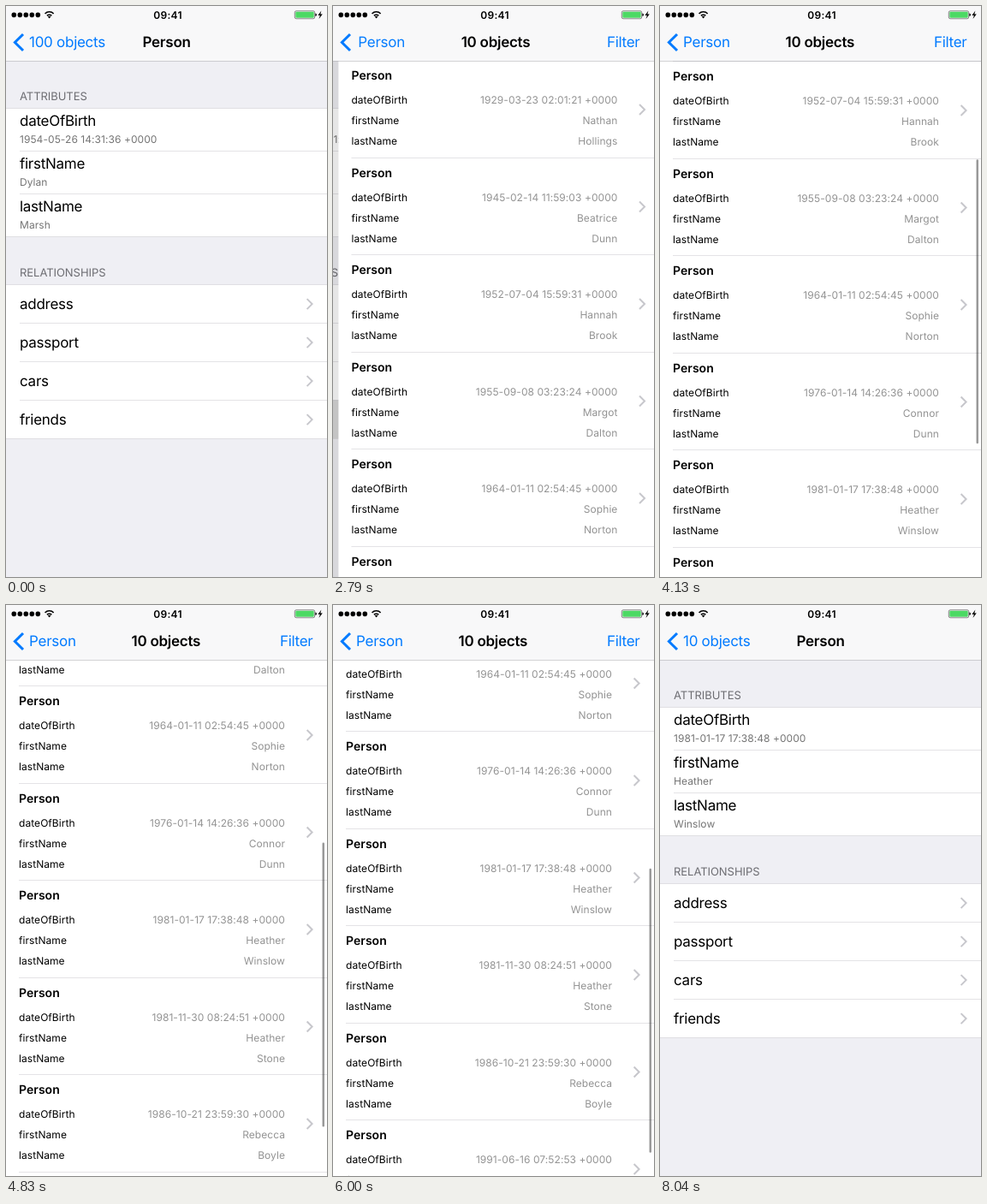
Recreate the animation shown at these times as an HTML page. Size 375 by 667 pixels, loop 9.12 s.

```html
<!DOCTYPE html>
<html lang="en">
<head>
<meta charset="utf-8">
<title>Object browser</title>
<style>
  html, body { margin: 0; width: 100%; height: 100%; overflow: hidden; background: #efeff4; }
  svg { display: block; width: 375px; height: 667px; }
  text { font-family: Inter, "Open Sans", sans-serif; text-rendering: geometricPrecision; }
  .big { font-size: 17px; letter-spacing: -.27px; }
  .bold { font-weight: 600; }
  .blue { fill: #007aff; }
  .small { font-size: 12px; letter-spacing: .06px; }
  .cell { font-size: 14px; font-weight: 600; letter-spacing: .04px; }
  .head { font-size: 13px; letter-spacing: -.05px; fill: #6d6d72; }
  .sub { fill: #747474; }
  .value { fill: #939393; text-anchor: end; }
  .clock { font-size: 12px; font-weight: 600; letter-spacing: .3px; text-anchor: middle; }
  .line { fill: #c8c7cc; }
  .more { fill: none; stroke: #c7c7cc; stroke-width: 2; }
</style>
</head>
<body>
<svg id="stage" viewBox="0 0 375 667"></svg>
<script>
const W = 375, H = 667, LOOP = 9120, BAR = 64, ROW = 113.5;
const PUSH = 540, TAPS = [2380, 6920];
const DRAG = 3660, RELEASE = 3900, TAU = 512, REST = 490.6, GLIDE = 415.3;

const people = [
  ['1929-03-23 02:01:21', 'Nathan', 'Hollings'],
  ['1945-02-14 11:59:03', 'Beatrice', 'Dunn'],
  ['1952-07-04 15:59:31', 'Hannah', 'Brook'],
  ['1955-09-08 03:23:24', 'Margot', 'Dalton'],
  ['1964-01-11 02:54:45', 'Sophie', 'Norton'],
  ['1976-01-14 14:26:36', 'Connor', 'Dunn'],
  ['1981-01-17 17:38:48', 'Heather', 'Winslow'],
  ['1981-11-30 08:24:51', 'Heather', 'Stone'],
  ['1986-10-21 23:59:30', 'Rebecca', 'Boyle'],
  ['1991-06-16 07:52:53', 'Olivia', 'Grant']
].map(([date, ...names]) => [date + ' +0000', ...names]);
const owner = ['1954-05-26 14:31:36 +0000', 'Dylan', 'Marsh'];
const fields = ['dateOfBirth', 'firstName', 'lastName'];
const relations = ['address', 'passport', 'cars', 'friends'];

const stage = document.getElementById('stage');

function add(parent, tag, attrs = {}, text) {
  const node = document.createElementNS('http://www.w3.org/2000/svg', tag);
  for (const key in attrs) node.setAttribute(key, attrs[key]);
  if (text) node.textContent = text;
  return parent.appendChild(node);
}
const box = (parent, x, y, width, height, fill) => add(parent, 'rect', { x, y, width, height, fill });
const label = (parent, x, y, cls, text) => add(parent, 'text', { x, y, class: cls }, text);
const line = (parent, x, y) => add(parent, 'rect', { x, y, width: W - x, height: .5, class: 'line' });
const more = (parent, y) => add(parent, 'path', { d: `M351.6 ${y - 6}l6 6-6 6`, class: 'more' });

function makeDetail(person) {
  const view = add(stage, 'g');
  box(view, 0, 0, W, H, '#efeff4');

  label(view, 16, 109.6, 'head', 'ATTRIBUTES');
  box(view, 0, 119.5, W, 150, '#fff');
  line(view, 0, 119.5);
  fields.forEach((name, i) => {
    const y = 119.5 + i * 50;
    label(view, 16, y + 20.5, 'big', name);
    label(view, 16, y + 40.7, 'small sub', person[i]);
    line(view, i < 2 ? 16 : 0, y + 49.5);
  });

  label(view, 16, 315.6, 'head', 'RELATIONSHIPS');
  box(view, 0, 325.5, W, 180, '#fff');
  line(view, 0, 325.5);
  const glow = box(view, 0, 460.2, W, 45, '#d9d9d9');
  relations.forEach((name, i) => {
    const y = 325.5 + i * 45;
    label(view, 16, y + 28.6, 'big', name);
    more(view, y + 22.6);
    line(view, i < 3 ? 16 : 0, y + 44.5);
  });
  return { view, glow };
}

function makeList() {
  const view = add(stage, 'g');
  box(view, 0, 0, W, H, '#fff');
  const rows = add(view, 'g');
  const glow = box(rows, 0, BAR + 6 * ROW - .5, W, ROW, '#d9d9d9');
  people.forEach((person, i) => {
    const y = BAR + i * ROW;
    label(rows, 15, y + 22.4, 'cell', 'Person');
    fields.forEach((name, j) => {
      label(rows, 15, y + 50.3 + j * 24, 'small', name);
      label(rows, 326, y + 50.3 + j * 24, 'small value', person[j]);
    });
    more(rows, y + 57);
    line(rows, 15, y + 113);
  });
  const thumb = add(view, 'rect', { x: 369.5, y: 0, width: 2.5, height: 332, rx: 1.25, fill: '#000' });
  return { view, glow, rows, thumb };
}

const screens = [makeDetail(owner), makeList(), makeDetail(people[6])];
const list = screens[1];
for (const s of screens) s.dim = box(s.view, 0, 0, W, H, '#000');

// Navigation bar
const nav = add(stage, 'g');
box(nav, 0, 0, W, BAR, '#f8f8f9');
box(nav, 0, BAR, W, .5, '#a7a7aa');
add(nav, 'path', { d: 'M20 33L10.4 42.5L20 52', fill: 'none', stroke: '#007aff', 'stroke-width': 3 });
const filter = label(nav, 358.5, 48, 'big blue', 'Filter');
filter.setAttribute('text-anchor', 'end');
const names = [['100 objects', 143], ['Person', 159.5], ['10 objects', 146.5], ['Person', 159.5]]
  .map(([text, left], i) => ({
    left,
    depth: i - 1,
    title: label(nav, 0, 48, 'big bold', text),
    back: label(nav, 0, 48, 'big blue', text)
  }));

// Status bar
for (let i = 0; i < 5; i++) add(nav, 'circle', { cx: 9.3 + i * 7, cy: 10.4, r: 2.8 });
for (const r of [3.7, 7]) {
  const a = r * .72;
  add(nav, 'path', {
    d: `M${50.6 - a} ${14 - a}A${r} ${r} 0 0 1 ${50.6 + a} ${14 - a}`,
    fill: 'none', stroke: '#000', 'stroke-width': 1.6
  });
}
add(nav, 'path', { d: 'M50.6 14.4l-1.8-1.9a2.6 2.6 0 0 1 3.6 0z' });
label(nav, 189, 14.6, 'clock', '09:41');
add(nav, 'rect', { x: 337.3, y: 5.8, width: 23.4, height: 9, rx: 1.8, fill: 'none', stroke: '#333', 'stroke-width': .6 });
add(nav, 'rect', { x: 338.3, y: 6.8, width: 21.4, height: 7, rx: 1, fill: '#4cd964' });
add(nav, 'path', { d: 'M361.4 8.6q1.5 .3 1.5 1.7t-1.5 1.7z' });
add(nav, 'path', { d: 'M368.4 5.6l-4 5.4h2.4l-1.2 4 4.2-5.6h-2.5z' });

const clamp = v => Math.min(1, Math.max(0, v));
const ramp = (t, from, to) => clamp((t - from) / (to - from));

// cubic-bezier(.36, .66, .04, 1)
function ease(x) {
  if (x <= 0 || x >= 1) return clamp(x);
  const curve = (a, b, u) => 3 * a * u * (1 - u) ** 2 + 3 * b * u * u * (1 - u) + u ** 3;
  let low = 0, high = 1;
  for (let i = 0; i < 24; i++) {
    const mid = (low + high) / 2;
    if (curve(.36, .04, mid) < x) low = mid; else high = mid;
  }
  return curve(.66, 1, low);
}

// Finger drag, then exponential slowdown
function scrollAt(t) {
  if (t < DRAG) return 0;
  if (t < RELEASE) return 12 + 63 * ramp(t, 3670, RELEASE) ** 3;
  return REST - GLIDE * Math.exp((RELEASE - Math.min(t, 6420)) / TAU);
}

function thumbAlpha(t) {
  if (t < DRAG) return ramp(t, 2940, 3000) * (1 - ramp(t, 3220, 3460));
  return 1 - ramp(t, 6230, 6500);
}

function place(node, x, alpha) {
  node.setAttribute('transform', `translate(${x.toFixed(2)} 0)`);
  node.setAttribute('opacity', clamp(alpha).toFixed(3));
}

function draw(t) {
  const depth = TAPS.reduce((sum, tap) => sum + ease((t - tap - 40) / PUSH), 0);

  screens.forEach((s, i) => {
    const k = depth - i;
    s.view.setAttribute('visibility', Math.abs(k) < 1 ? 'visible' : 'hidden');
    s.view.setAttribute('transform', `translate(${(k < 0 ? -k * W : -k * 112.5).toFixed(2)} 0)`);
    s.dim.setAttribute('opacity', .1 * clamp(k));
    s.glow.setAttribute('opacity', t >= TAPS[i] ? 1 : 0);
  });

  for (const n of names) {
    const k = depth - n.depth;
    const slide = n.left + (27 - n.left) * k;
    place(n.title, k < 0 ? n.left - k * 187.5 : slide, k < 0 ? 1 + k : 1 - k * 1.5);
    place(n.back, k < 1 ? slide : 27 - (k - 1) * 100, k < 1 ? k * 1.5 - .5 : 1 - (k - 1) * 1.5);
  }
  filter.setAttribute('opacity', clamp(1 - Math.abs(depth - 1)));

  const scroll = Math.round(scrollAt(t) * 2) / 2;
  list.rows.setAttribute('transform', `translate(0 ${-scroll})`);
  list.thumb.setAttribute('y', 66.3 + scroll * .4995);
  list.thumb.setAttribute('opacity', .4 * thumbAlpha(t));
}

const start = performance.now();
function tick() {
  draw((performance.now() - start) % LOOP);
  requestAnimationFrame(tick);
}
tick();
</script>
</body>
</html>
```
